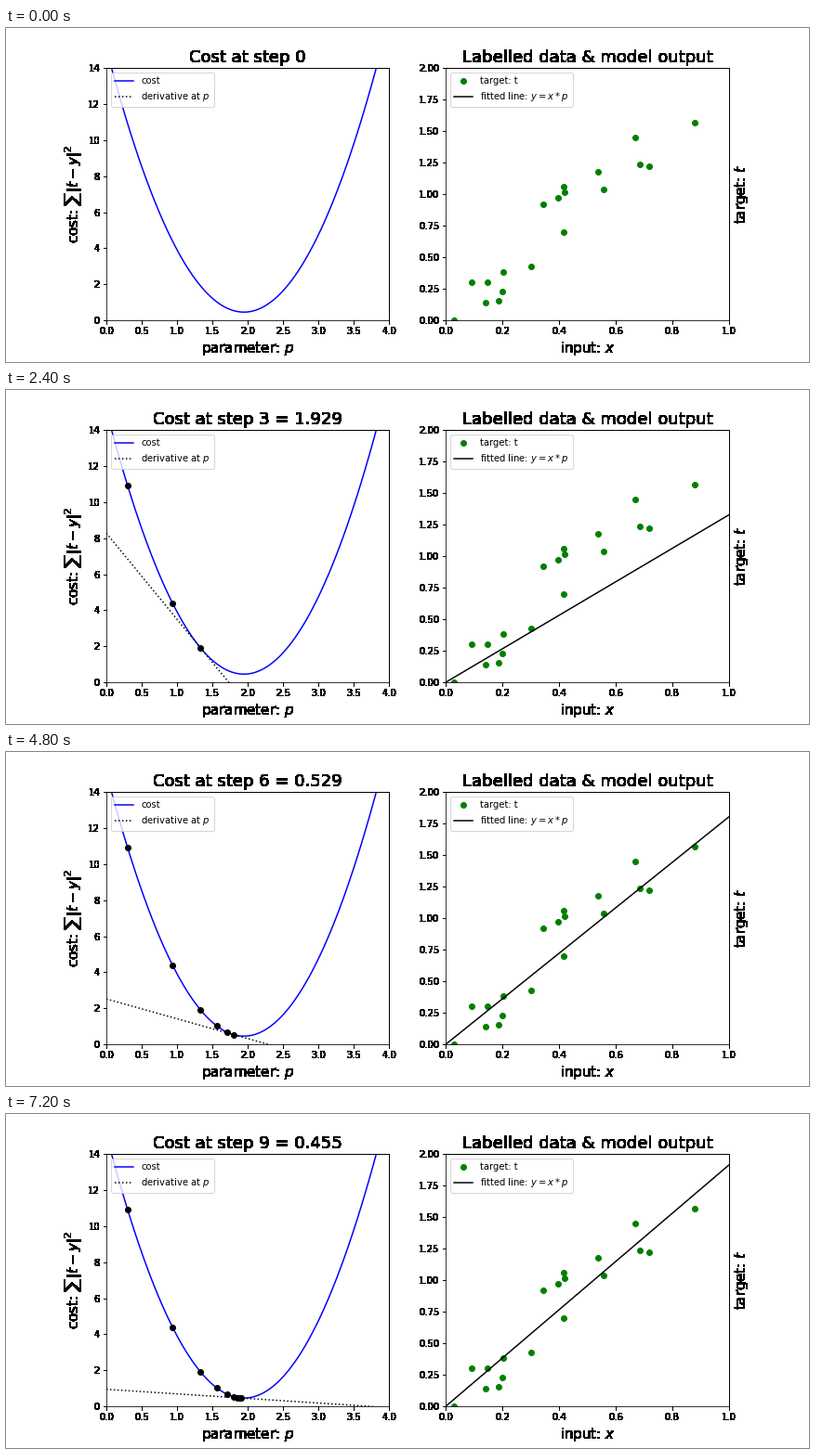
These frames come from a looping animation (864x360 px, 8000 ms). A matplotlib script:

```python
import numpy as np
import matplotlib.pyplot as plt
from matplotlib.animation import FuncAnimation

STEPS = 10
STEP_MS = 800
RATE = 0.05
START = 0.3

# Noisy samples of t = 2x
np.random.seed(1)
x = np.random.uniform(0, 1, 20)
t = 2 * x + np.random.randn(20) * 0.2


def cost(p):
    return np.sum((t - np.multiply.outer(p, x)) ** 2, axis=-1)


def slope(p):
    return 2 * np.sum(x * (x * p - t))


params = [START]
while len(params) < STEPS - 1:
    params.append(params[-1] - RATE * slope(params[-1]))
params = np.array(params)


def harden(img, dpi):
    """Turn every touched pixel solid black, for hard-edged glyphs."""
    out = np.zeros_like(img)
    out[..., 3] = img[..., 3] > 0
    return out, 0, 0


def harden_axes(ax):
    parts = [ax.title, ax.xaxis.label, ax.yaxis.label,
             ax.spines["top"], ax.spines["right"]]
    for axis in (ax.xaxis, ax.yaxis):
        for tick in axis.get_major_ticks():
            parts += [tick.tick1line, tick.label1]
    for part in parts:
        part.set_agg_filter(harden)


fig, (left, right) = plt.subplots(1, 2, figsize=(12, 5), dpi=72, facecolor="white")
fig.subplots_adjust(left=0.125, right=0.9, bottom=0.125, top=0.88, wspace=0.2)

# Cost curve
grid = np.linspace(0, 4, 100)
left.plot(grid, cost(grid), "b-", label="cost")
tangent, = left.plot([], [], "k:", label="derivative at $p$")
visited, = left.plot([], [], "ko")
left.set(xlim=(0, 4), ylim=(0, 14))
left.set_xlabel("parameter: $p$", fontsize=15)
left.set_ylabel(r"cost: $\sum |t - y|^2$", fontsize=15)
title = left.set_title("Cost at step 0", fontsize=18)
left.legend(loc="upper left")

# Data and fitted line
right.plot(x, t, "go", label="target: t")
fit, = right.plot([], [], "k-", label="fitted line: $y = x*p$")
right.set(xlim=(0, 1), ylim=(0, 2))
right.set_xlabel("input: $x$", fontsize=15)
right.set_ylabel("target: $t$", fontsize=15)
right.yaxis.set_label_position("right")
right.set_title("Labelled data & model output", fontsize=18)
right.legend(loc="upper left")

for ax in (left, right):
    harden_axes(ax)


def draw(step):
    seen = params[:step]
    visited.set_data(seen, cost(seen))
    if step == 0:
        title.set_text("Cost at step 0")
        tangent.set_data([], [])
        fit.set_data([], [])
    else:
        p = seen[-1]
        c = cost(p)
        title.set_text(f"Cost at step {step} = {c:.3f}")
        tangent.set_data(grid, c + slope(p) * (grid - p))
        fit.set_data([0, 1], [0, p])
    return title, tangent, visited, fit


anim = FuncAnimation(fig, draw, frames=STEPS, interval=STEP_MS,
                     init_func=lambda: draw(0), repeat=True, repeat_delay=0)
plt.show()
```
